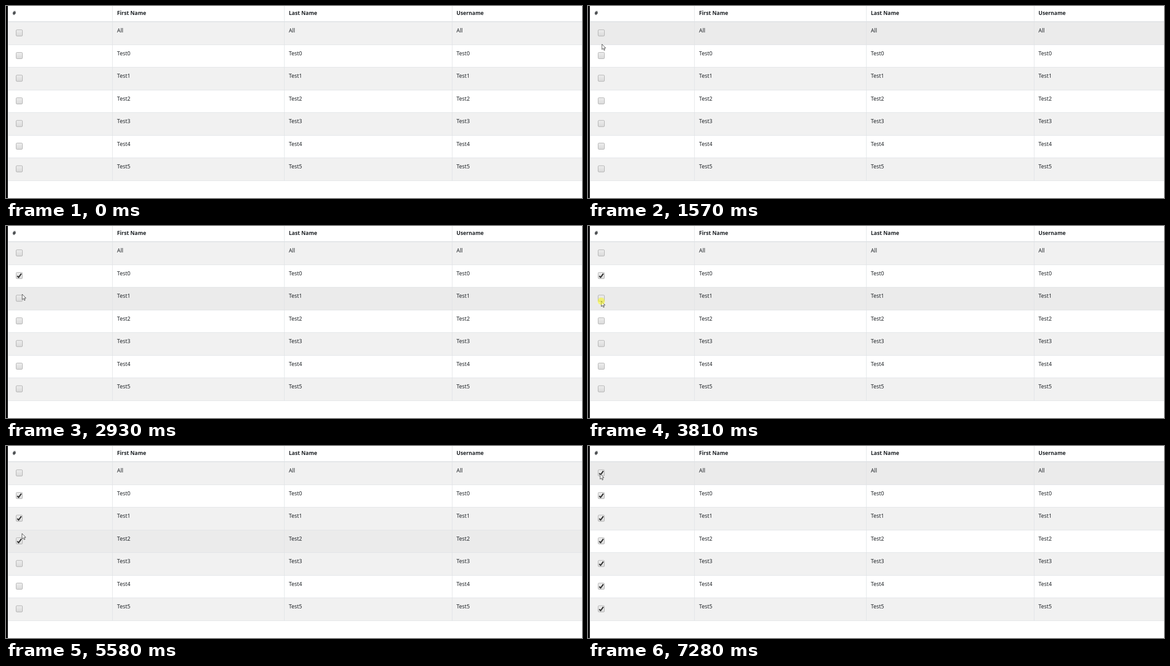
Animation, 1280 px wide and 428 px high, one loop 8000 ms. Source, as an HTML page:

```html
<!DOCTYPE html>
<html lang="en">
<head>
<meta charset="utf-8">
<title>Checkbox table</title>
<style>
  html, body { margin: 0; width: 100%; height: 100%; overflow: hidden; background: #fff; }
  svg { display: block; width: 1280px; height: 428px; }
  text { font: 12px "Noto Sans", "Open Sans", sans-serif; fill: #212529; }
  .head { font-size: 11.8px; font-weight: 700; }
  .line { fill: #dfe2e5; shape-rendering: crispEdges; }
  .row { shape-rendering: crispEdges; }
  .box { fill: url(#face); stroke: #a8a8a8; }
  .check { fill: none; stroke: #363636; stroke-width: 2.7; }
</style>
</head>
<body>
<svg viewBox="0 0 1280 428">
  <defs>
    <linearGradient id="face" x2="0" y2="1">
      <stop offset="0" stop-color="#ededed"/>
      <stop offset="1" stop-color="#dadada"/>
    </linearGradient>
  </defs>
  <g id="table"></g>
  <rect width="4" height="428" fill="#000"/>
  <g id="pointer">
    <path d="M0 0V12L2.8 9.5L4.7 13.8L6.6 13L4.8 8.8H8.4Z" fill="#fff" stroke="#222" stroke-width=".9"/>
    <circle id="press" r="8" fill="#ff0" fill-opacity=".47"/>
  </g>
</svg>
<script>
const LOOP = 8000, TOP = 35.5, ROW = 50.5;
const COLUMNS = [[246.8, 'First Name'], [628.4, 'Last Name'], [1001, 'Username']];
const LABELS = ['All', ...Array.from({ length: 6 }, (_, i) => 'Test' + i)];

// The pointer glides from rest to rest through one bend, then clicks a row's box.
const at = (time, x, y) => ({ time, x, y });
const ENTER = at(140, 520, 310);
const GLIDES = [
  { start: 140, bend: at(210, 297, 40), rest: at(360, 12, 16) },
  { start: 650, bend: at(1570, 31, 85), rest: at(2150, 28.5, 107.5), row: 1, down: 2380, up: 2550 },
  { start: 2800, bend: at(2930, 36, 152), rest: at(3590, 29.5, 167.5), row: 2, down: 3810, up: 4060 },
  { start: 4260, bend: at(4380, 30, 198), rest: at(4770, 29.5, 209.5), row: 3, down: 4950, up: 5190 },
  { start: 5510, bend: at(5910, 64, 128), rest: at(6820, 27, 62), row: 0, down: 7050, up: 7280 },
];

const $ = id => document.getElementById(id);
const table = $('table'), pointer = $('pointer'), press = $('press');

function add(tag, attrs, text = '') {
  const el = document.createElementNS('http://www.w3.org/2000/svg', tag);
  for (const [key, value] of Object.entries(attrs)) el.setAttribute(key, value);
  el.textContent = text;
  return table.appendChild(el);
}

const rowTop = i => Math.floor(TOP + ROW * i);
const line = (x, y, width, height) => add('rect', { class: 'line', x, y, width, height });

const rows = LABELS.map((_, i) => add('rect', {
  class: 'row', x: 4, y: rowTop(i), width: 1276, height: rowTop(i + 1) - rowTop(i),
}));
LABELS.forEach((_, i) => line(4, rowTop(i + 1), 1276, 1));
line(4, 34, 1276, 2);
[236, 618, 991].forEach(x => line(x, 0, 1, 390));
line(4, 0, 1, 428);

add('text', { class: 'head', x: 14.5, y: 20 }, '#');
for (const [x, title] of COLUMNS) {
  add('text', { class: 'head', x, y: 20 }, title);
  LABELS.forEach((label, i) => add('text', { x, y: 59 + ROW * i }, label));
}

const checks = LABELS.map((_, i) => {
  const y = 60 + ROW * i;
  add('rect', { class: 'box', x: 22.5, y: y - 7, width: 14, height: 14, rx: 2 });
  return add('path', { class: 'check', d: `M25 ${y + .8}l3 3.2L34.2 ${y - 4.4}` });
});

function pointerAt(t) {
  let from = ENTER;
  for (const { start, bend, rest } of GLIDES) {
    if (t <= start) break;
    const leg = t < bend.time ? [{ ...from, time: start }, bend] : [bend, rest];
    const [a, b] = leg;
    const part = Math.min(1, (t - a.time) / (b.time - a.time));
    from = { x: a.x + (b.x - a.x) * part, y: a.y + (b.y - a.y) * part };
  }
  return from;
}

const show = (el, on) => el.setAttribute('visibility', on ? 'visible' : 'hidden');

function draw(t) {
  const { x, y } = pointerAt(t), entered = t >= ENTER.time;
  const hovered = entered ? Math.floor((y - TOP) / ROW) : -1;
  rows.forEach((row, i) =>
    row.setAttribute('fill', i === hovered ? '#ebebeb' : i % 2 ? '#fff' : '#f1f1f1'));
  // Clicking the first row checks every box.
  checks.forEach((check, i) =>
    show(check, GLIDES.some(({ row, up }) => t >= up && (row === i || row === 0))));
  show(pointer, entered);
  show(press, GLIDES.some(({ down, up }) => t >= down && t < up));
  pointer.setAttribute('transform', `translate(${x} ${y})`);
}

const began = performance.now();
function tick() {
  draw((performance.now() - began) % LOOP);
  requestAnimationFrame(tick);
}
tick();
</script>
</body>
</html>
```
